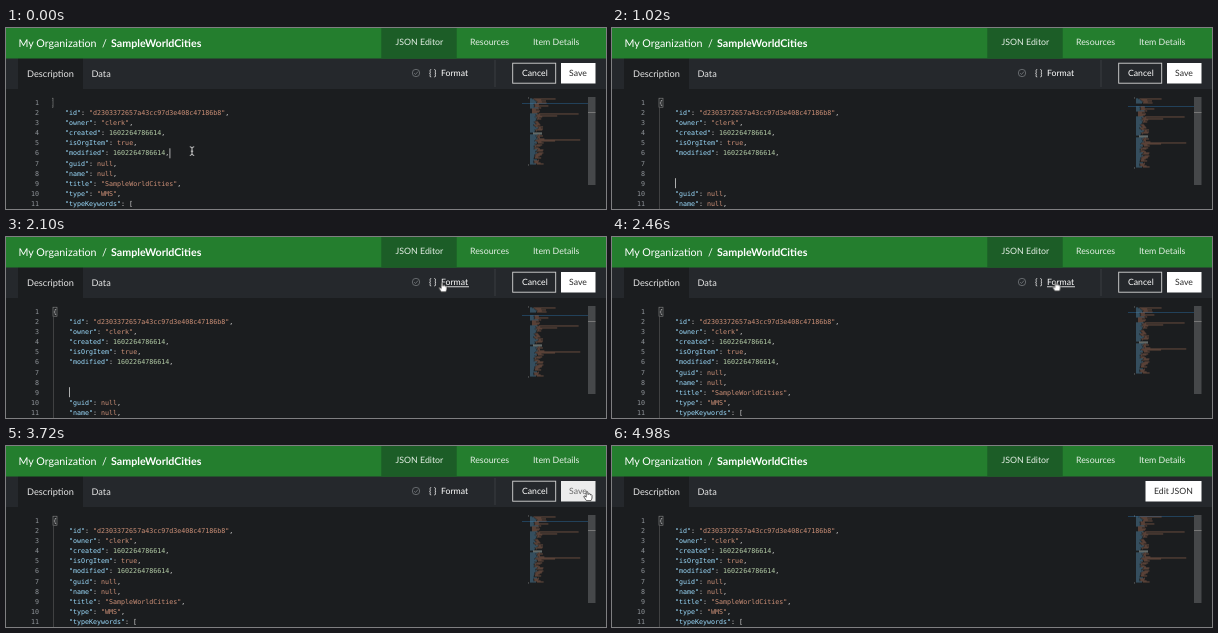
Write an HTML page that moves like this. It is 600 by 181 pixels and loops after 5220 ms.

```html
<!DOCTYPE html>
<html lang="en">
<head>
<meta charset="utf-8">
<title>JSON editor</title>
<style>
html, body { margin: 0; width: 100%; height: 100%; overflow: hidden; background: #1b1d1f; }
svg { display: block; width: 600px; height: 181px; }
text { font-family: Lato, "Open Sans", sans-serif; fill: #fff; text-rendering: geometricPrecision; white-space: pre; }
.title { font-size: 10.7px; }
.nav { font-size: 8.8px; fill: #e4efe5; }
.tab { font-size: 9.2px; fill: #e6e6e6; }
.btn { font-size: 8.7px; }
.dark { fill: #2b2b2b; }
.code text { font: 6.67px "DejaVu Sans Mono", "Liberation Mono", monospace; fill: #d4d4d4; }
.code .num { fill: #8f9499; text-anchor: end; }
.code .key { fill: #9cdcfe; }
.code .str, .code .lit { fill: #ce9178; }
.code .val { fill: #b5cea8; }

/* One shared loop; percentages are ms / 52.2 */
.anim { animation: 5220ms step-end infinite; }
.shift { animation-name: shift; }
#scroll { animation-name: scroll; }
#caret { animation-name: caret; }
#beam { animation-name: beam; }
#mark { animation-name: mark; }
#under { animation-name: under; }
#tools { animation-name: tools; }
#edit { animation-name: edit; }
#save { animation-name: save; }
#label { animation-name: label; }
#pointer { animation-name: move; }
#arrow { animation-name: arrow; }
#hand { animation-name: hand; }

#lower { --row: 10.05px; }
#mapLower { --row: 1px; }
@keyframes shift {
  0%, 45.98%, 100% { transform: none; }
  16.09% { transform: translateY(var(--row)); }
  17.24% { transform: translateY(calc(var(--row) * 2)); }
  19.54% { transform: translateY(calc(var(--row) * 3)); }
}
/* The view starts one column to the right; the first new line brings it back */
@keyframes scroll { 0% { transform: translateX(-4px); } 16.09%, 100% { transform: none; } }
@keyframes caret {
  0% { transform: translate(167.4px, 120.3px); visibility: visible; }
  8.05% { transform: translate(167.4px, 120.3px); visibility: hidden; }
  16.09% { transform: translate(63px, 130.1px); visibility: visible; }
  17.24% { transform: translate(63px, 140.2px); visibility: visible; }
  19.54% { transform: translate(63px, 150.2px); visibility: visible; }
  45.98%, 100% { transform: translate(63px, 150.2px); visibility: hidden; }
}
@keyframes beam { 0% { visibility: visible; } 11.49%, 100% { visibility: hidden; } }
@keyframes mark {
  0%, 45.98% { transform: none; }
  16.09% { transform: translateY(1px); }
  17.24% { transform: translateY(2px); }
  19.54% { transform: translateY(3px); }
  77.01%, 100% { transform: translateY(-5px); }
}
@keyframes under { 0% { visibility: hidden; } 39.08% { visibility: visible; } 56.32%, 100% { visibility: hidden; } }
@keyframes tools { 0% { visibility: visible; } 77.01%, 100% { visibility: hidden; } }
@keyframes edit { 0% { visibility: hidden; } 77.01%, 100% { visibility: visible; } }
@keyframes save { 0% { fill: #fff; } 65.52%, 100% { fill: #ececec; } }
@keyframes label { 0% { fill: #2b2b2b; } 62.07%, 100% { fill: #6a6a6a; } }
@keyframes move {
  0% { transform: translate(186px, 123px); }
  22.99% { transform: translate(186px, 123px); animation-timing-function: steps(8); }
  32.18% { transform: translate(413px, 48px); }
  33.33% { transform: translate(413px, 48px); animation-timing-function: steps(8); }
  42.53% { transform: translate(443.5px, 44.5px); }
  55.17% { transform: translate(443.5px, 44.5px); animation-timing-function: steps(7); }
  63.22% { transform: translate(576px, 44.5px); }
  65.52% { transform: translate(576px, 44.5px); animation-timing-function: steps(5); }
  71.26%, 100% { transform: translate(581px, 45px); }
}
@keyframes arrow {
  0%, 39.08%, 58.62%, 100% { visibility: hidden; }
  22.99%, 56.32% { visibility: visible; }
}
@keyframes hand {
  0%, 56.32%, 89.66%, 100% { visibility: hidden; }
  39.08%, 58.62% { visibility: visible; }
}
</style>
</head>
<body>
<svg viewBox="0 0 600 181">
  <clipPath id="view"><rect x="46.5" y="61" width="469" height="120"/></clipPath>
  <rect width="600" height="181" fill="#1b1d1f"/>
  <rect y="30" width="600" height="31" fill="#25282c"/>
  <rect x="12" y="30" width="65" height="31" fill="#1b1d1f"/>
  <rect width="600" height="30.5" fill="#247e2e"/>
  <rect x="375.3" width="75.4" height="30.5" fill="#1c5d27"/>
  <text class="title" x="12.5" y="19">My Organization</text>
  <text class="title" x="96" y="19">/</text>
  <text class="title" x="105" y="19" font-weight="700">SampleWorldCities</text>
  <text class="nav" x="389.5" y="16.5">JSON Editor</text>
  <text class="nav" x="464" y="16.5">Resources</text>
  <text class="nav" x="527" y="16.5">Item Details</text>
  <text class="tab" x="21" y="48.5">Description</text>
  <text class="tab" x="85.5" y="48.5">Data</text>

  <g class="code">
    <g id="numbers"></g>
    <g clip-path="url(#view)">
      <g id="scroll" class="anim">
        <path d="M47.5 80V181" stroke="#5c5c5c" stroke-width=".6"/>
        <rect x="47" y="70.2" width="4" height="9" fill="none" stroke="#8a8a8a" stroke-width=".6"/>
        <text x="47" y="77.2">{</text>
        <g id="upper"></g>
        <g id="lower" class="anim shift"></g>
        <rect id="caret" class="anim" width=".9" height="10" fill="#c0c0c0"/>
      </g>
    </g>
  </g>

  <rect id="mark" class="anim" x="516" y="75" width="66" height="1" fill="#22415a"/>
  <g opacity=".75">
    <g id="mapUpper"></g>
    <g id="mapLower" class="anim shift"></g>
  </g>
  <rect x="582" y="69" width="7.5" height="88" fill="#46484a"/>
  <rect x="582" y="84" width="7.5" height="1" fill="#777"/>

  <g id="tools" class="anim">
    <g fill="none" stroke="#75797d" stroke-width=".8">
      <circle cx="410" cy="45" r="3.7"/>
      <path d="M408.2 45.1l1.3 1.4 2.5-2.9"/>
    </g>
    <text class="btn" x="423" y="48">{ }</text>
    <text class="btn" x="435" y="48">Format</text>
    <rect id="under" class="anim" x="435" y="49.4" width="28" height=".8" fill="#fff"/>
    <rect x="488.5" y="32" width="1" height="27" fill="#3a3d41"/>
    <rect x="506.7" y="35.2" width="43" height="20" fill="none" stroke="#d4d4d4" stroke-width=".9"/>
    <text class="btn" x="516" y="48">Cancel</text>
    <rect id="save" class="anim" x="555" y="35" width="34.5" height="20.5" fill="#fff"/>
    <text id="label" class="btn dark anim" x="563" y="48">Save</text>
  </g>
  <g id="edit" class="anim">
    <rect x="533.5" y="35" width="56" height="20.5" fill="#fff"/>
    <text class="btn dark" x="542" y="48">Edit JSON</text>
  </g>

  <path id="beam" class="anim" d="M-2.2-4.2Q0-4.2 0-2.6V2.8Q0 4.4-2.2 4.4M2.2-4.2Q0-4.2 0-2.6M2.2 4.4Q0 4.4 0 2.8M-1.2 .2H1.2" transform="translate(186 123)" fill="none" stroke="#ccc"/>
  <g id="pointer" class="anim">
    <path id="arrow" class="anim" d="M.5 .5V9L2.5 7.2 3.8 10.3 5.3 9.7 4 6.7H6.6Z" fill="#111" stroke="#fff" stroke-width=".8"/>
    <path id="hand" class="anim" d="M-.8 1Q0-.4 .9 1V3.6Q2 2 3.2 2.9L3.4 4Q4.6 3 5 4.5V7Q4.8 8.3 4 9.6H-.6L-3.2 5.8Q-3.2 4.4-1.8 5.2L-.8 6.2Z" fill="#fff" stroke="#222" stroke-width=".7"/>
  </g>
</svg>
<script>
const NS = "http://www.w3.org/2000/svg";
const ROW = 10.05, BASE = 77.2;
const byId = id => document.getElementById(id);

function add(parent, tag, attrs, content) {
  const node = document.createElementNS(NS, tag);
  for (const name in attrs) node.setAttribute(name, attrs[name]);
  if (content !== undefined) node.textContent = content;
  parent.append(node);
  return node;
}

const fields = [
  '"id": "d2303372657a43cc97d3e408c47186b8",',
  '"owner": "clerk",',
  '"created": 1602264786614,',
  '"isOrgItem": true,',
  '"modified": 1602264786614,',
  '"guid": null,',
  '"name": null,',
  '"title": "SampleWorldCities",',
  '"type": "WMS",',
  '"typeKeywords": ['
];

function tokenClass(token, index) {
  if (index === 0) return "key";
  if (token[0] === '"') return "str";
  if (/^\d/.test(token)) return "val";
  return /^[a-z]/.test(token) ? "lit" : "";
}

fields.forEach((field, i) => {
  const group = byId(i < 5 ? "upper" : "lower");
  const line = add(group, "text", { x: 63, y: BASE + ROW * (i + 1) });
  field.match(/"[^"]*"|\w+|[^"\w]+/g).forEach((token, k) =>
    add(line, "tspan", { class: tokenClass(token, k) }, token));
});

for (let n = 1; n <= 11; n++)
  add(byId("numbers"), "text", { class: "num", x: 33, y: BASE + ROW * (n - 1) }, n);

// Code overview: one pixel per line, key then value
const noise = n => { const s = Math.sin(n * 12.9898) * 43758.5453; return s - Math.floor(s); };
const longRows = { 16: 40, 18: 20, 42: 44, 43: 20 };

function mapRow(n) {
  const group = byId(n < 6 ? "mapUpper" : "mapLower");
  const bar = (x, width, fill) => add(group, "rect", { x, y: 69.6 + n, width, height: .75, fill });
  if (n === 0 || n === 67) return bar(522, 1, "#aaa");
  if (n === 35 || n === 36) return bar(527, 9, "#b9c4bd");
  const field = fields[n - 1];
  const key = field ? field.indexOf(":") * .6 : 3 + 5 * noise(n);
  const value = field ? (field.length - field.indexOf(":")) * .6 : longRows[n] || 7 * noise(n + 90);
  const listed = n > 10 && n < 16;
  const indent = listed ? 4 : 2;
  bar(522 + indent, key, listed ? "#a56f57" : "#568caa");
  if (!listed) bar(523 + indent + key, value, "#a56f57");
}
for (let n = 0; n < 68; n++) mapRow(n);
</script>
</body>
</html>
```
